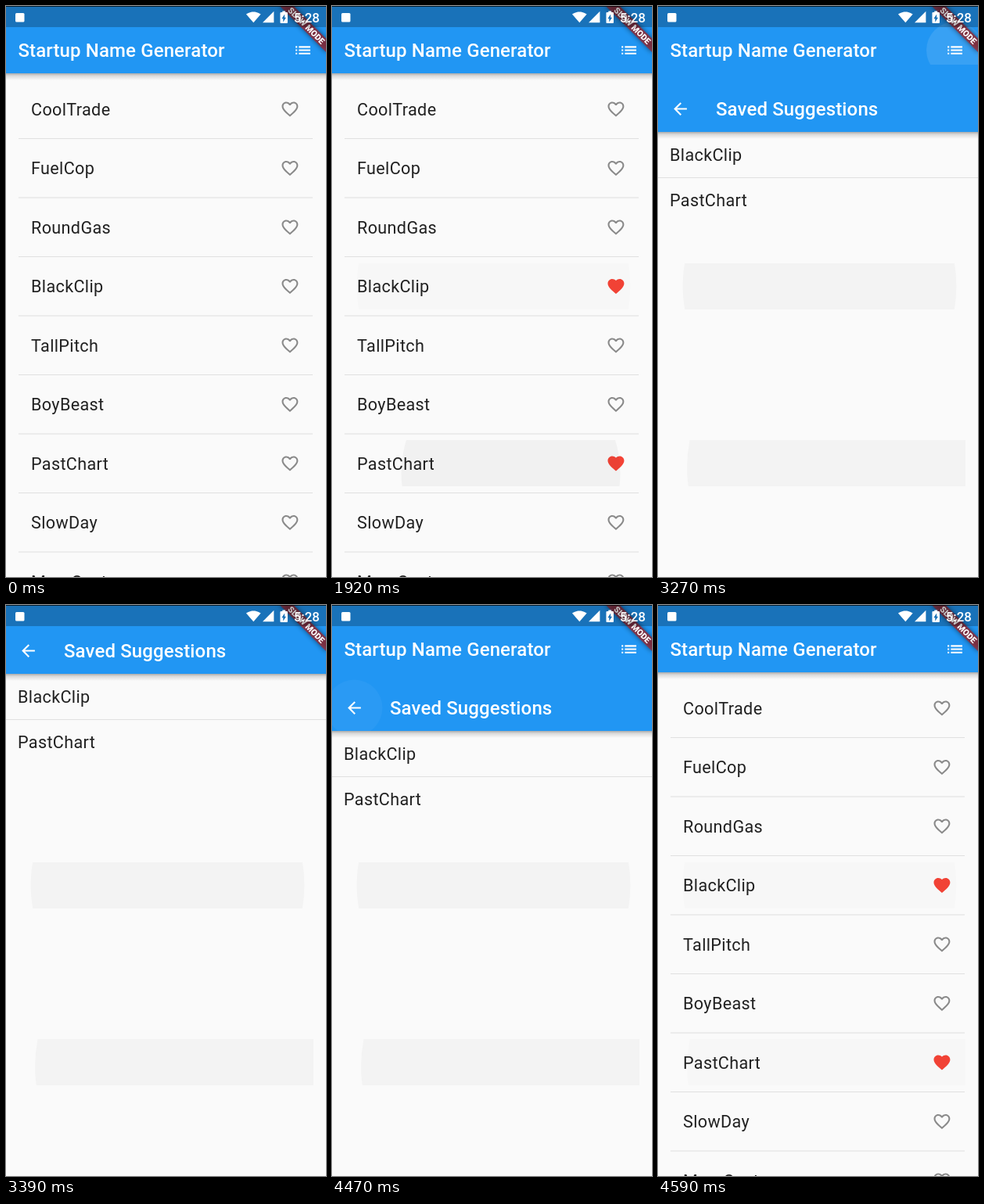
An HTML page that plays this animation: 409 by 730 pixels, repeating every 5.58 s.

```html
<!DOCTYPE html>
<html lang="en">
<head>
<meta charset="utf-8">
<title>Startup Name Generator</title>
<style>
  html, body { margin: 0; width: 100%; height: 100%; overflow: hidden; background: #fafafa; }
  svg { display: block; width: 100vw; height: 100vh; }
  text { font-family: Roboto, "Open Sans", sans-serif; white-space: pre; }
  .title { font-size: 24px; font-weight: 500; letter-spacing: .12px; fill: #fff; }
  .name { font-size: 21.6px; letter-spacing: .35px; fill: #212121; }
  .clock { font-size: 16.8px; font-weight: 500; fill: #fff; }
  .ribbon { font-size: 10.7px; font-weight: 900; fill: #fff; text-anchor: middle; }
</style>
</head>
<body>
<svg viewBox="0 0 409 730">
  <defs>
    <linearGradient id="fade" x1="0" y1="0" x2="0" y2="1">
      <stop offset="0" stop-color="#000" stop-opacity=".32"/>
      <stop offset=".35" stop-color="#000" stop-opacity=".13"/>
      <stop offset="1" stop-color="#000" stop-opacity="0"/>
    </linearGradient>
    <filter id="blur" x="-20%" y="-100%" width="140%" height="300%"><feGaussianBlur stdDeviation="3"/></filter>
    <clipPath id="bar"><rect width="409" height="86"/></clipPath>
    <clipPath id="tileA"><rect x="16" y="329" width="377" height="59"/></clipPath>
    <clipPath id="tileB"><rect x="16" y="555" width="377" height="59"/></clipPath>
    <path id="heartLine" d="M16.5 3c-1.74 0-3.41.81-4.5 2.09C10.91 3.81 9.24 3 7.5 3 4.42 3 2 5.42 2 8.5c0 3.78 3.4 6.86 8.55 11.54L12 21.35l1.45-1.32C18.6 15.36 22 12.28 22 8.5 22 5.42 19.58 3 16.5 3zm-4.4 15.55l-.1.1-.1-.1C7.14 14.24 4 11.39 4 8.5 4 6.5 5.5 5 7.5 5c1.54 0 3.04.99 3.57 2.36h1.87C13.46 5.99 14.96 5 16.5 5c2 0 3.5 1.5 3.5 3.5 0 2.89-3.14 5.74-7.9 10.05z"/>
    <path id="heartFull" d="M12 21.35l-1.45-1.32C5.4 15.36 2 12.28 2 8.5 2 5.42 4.42 3 7.5 3c1.74 0 3.41.81 4.5 2.09C13.09 3.81 14.76 3 16.5 3 19.58 3 22 5.42 22 8.5c0 3.78-3.4 6.86-8.55 11.54L12 21.35z"/>
    <g id="appBar">
      <rect y="86" width="409" height="9" fill="url(#fade)"/>
      <rect width="409" height="86" fill="#2196f3"/>
    </g>
  </defs>

  <g id="home">
    <rect width="409" height="730" fill="#fafafa"/>
    <g id="rows"></g>
    <use href="#appBar"/>
    <circle id="menuInk" cx="379.5" cy="56.5" r="36.5" fill="#fff" clip-path="url(#bar)"/>
    <text class="title" x="15.5" y="64.5">Startup Name Generator</text>
    <path transform="translate(367 44) scale(1.045)" fill="#fff" d="M3 13h2v-2H3zm0 4h2v-2H3zm0-8h2V7H3zm4 4h14v-2H7zm0 4h14v-2H7zM7 7v2h14V7z"/>
  </g>

  <g id="saved">
    <rect width="409" height="730" fill="#fafafa"/>
    <use href="#appBar"/>
    <circle id="backInk" cx="28.5" cy="56.5" r="36" fill="#fff" clip-path="url(#bar)"/>
    <path transform="translate(16 44) scale(1.045)" fill="#fff" d="M20 11H7.83l5.59-5.59L12 4l-8 8 8 8 1.41-1.41L7.83 13H20z"/>
    <text class="title" x="74" y="64.5">Saved Suggestions</text>
    <text class="name" x="15" y="122.7">BlackClip</text>
    <rect y="144" width="409" height="1" fill="#e0e0e0"/>
    <text class="name" x="15" y="181.4">PastChart</text>
  </g>

  <g clip-path="url(#tileA)"><circle id="inkA"/></g>
  <g clip-path="url(#tileB)"><circle id="inkB"/></g>

  <g transform="translate(409 0) rotate(45)">
    <rect x="-41.8" y="29.3" width="83.6" height="12.5" opacity=".5" filter="url(#blur)"/>
    <rect x="-41.8" y="29.3" width="83.6" height="12.5" fill="#b71c1c" fill-opacity=".63"/>
    <text class="ribbon" y="39.3">SLOW MODE</text>
  </g>

  <rect width="409" height="27" fill-opacity=".24"/>
  <rect width="409" height="1" fill-opacity=".75"/>
  <g fill="#fff">
    <rect x="12" y="9" width="11.5" height="11.5" rx="1.5"/>
    <path transform="translate(306.7 5.2) scale(.8 .75)" d="M12 21.5L23.64 7c-.45-.34-4.93-4-11.64-4S.81 6.66.36 7z"/>
    <path d="M328 21.3h14.4V6.8z"/>
    <path transform="translate(343.8 5) scale(.95 .77)" fill-rule="evenodd" d="M15.67 4H14V2h-4v2H8.33C7.6 4 7 4.6 7 5.33v15.33C7 21.4 7.6 22 8.33 22h7.33c.74 0 1.34-.6 1.34-1.33V5.33C17 4.6 16.4 4 15.67 4zM11 20v-5.5H9L13 7v5.5h2z"/>
  </g>
  <text class="clock" x="367.7" y="21">5:28</text>
</svg>

<script>
const LOOP = 5580, TICK = 30;
const $ = id => document.getElementById(id);

const names = ["CoolTrade", "FuelCop", "RoundGas", "BlackClip", "TallPitch",
  "BoyBeast", "PastChart", "SlowDay", "MoreCost"];
const likedAt = { BlackClip: 960, PastChart: 1800 };

// Saved page: [time, offset down, opacity]
const slide = [
  [0, 0, 0],
  [3240, 166, .25], [3270, 75, 1], [3300, 31, 1], [3330, 16, 1],
  [3360, 7, 1], [3390, 2, 1], [3420, 0, 1],
  [4380, 7, 1], [4410, 18, 1], [4440, 39, 1], [4470, 75, 1],
  [4500, 131, .7], [4530, 167, .25], [4560, 180, .06], [4590, 0, 0]
];

// Button inks: [time, opacity]
const menuInk = [[0, 0], [3180, .03], [3240, .06], [3270, .1], [3420, 0]];
const backInk = [[0, 0], [4350, .01], [4410, .03], [4470, .04], [4560, .02], [4590, 0]];

// Row inks, blended: [time, x, y, radius, opacity]
const inkA = [
  [930, 250, 362, 10, 0], [960, 248, 362, 30, .03], [1140, 210, 359, 160, .035],
  [1200, 206.5, 358, 175, .03], [1440, 206.5, 358, 175, .01],
  [3240, 206.5, 358, 175, .01], [3270, 206.5, 358, 175, .028],
  [4560, 206.5, 358, 175, .028], [4590, 206.5, 358, 175, .01]
];
const inkB = [
  [1770, 250, 602, 20, 0], [1800, 246, 601, 60, .035], [1920, 228.5, 597, 140, .035],
  [2040, 217, 590, 180, .03], [2250, 217, 590, 180, .01],
  [3240, 217, 590, 180, .01], [3270, 217, 590, 180, .028],
  [4560, 217, 590, 180, .028], [4590, 217, 590, 180, .01]
];

$("rows").innerHTML = names.map((name, i) => {
  const y = 75.5 * i;
  const heart = (id, shape, color) =>
    `<use id="${id}" href="#${shape}" fill="${color}" transform="translate(350.4 ${119.3 + y}) scale(1.045)"/>`;
  return `<text class="name" x="32" y="${139.5 + y}">${name}</text>` +
    heart("line" + name, "heartLine", "#8a8a8a") +
    (likedAt[name] ? heart("full" + name, "heartFull", "#f44336") : "") +
    `<rect x="16" y="${169 + y}" width="376" height="1" fill="#e0e0e0"/>`;
}).join("");

const step = (keys, t) => keys.findLast(k => k[0] <= t);

function blend(keys, t) {
  const i = keys.findIndex(k => k[0] > t);
  if (i < 0) return keys.at(-1);
  if (i === 0) return keys[0];
  const a = keys[i - 1], b = keys[i], p = (t - a[0]) / (b[0] - a[0]);
  return a.map((v, n) => v + (b[n] - v) * p);
}

function set(id, attrs) {
  for (const key in attrs) $(id).setAttribute(key, attrs[key]);
}

function spread(id, keys, t) {
  const [, cx, cy, r, opacity] = blend(keys, t);
  set(id, { cx, cy, r, opacity });
}

function draw(now) {
  const t = Math.floor((now % LOOP) / TICK) * TICK;
  for (const name in likedAt) {
    const on = t >= likedAt[name];
    set("line" + name, { opacity: on ? 0 : 1 });
    set("full" + name, { opacity: on ? 1 : 0 });
  }
  const [, y, opacity] = step(slide, t);
  set("saved", { transform: `translate(0 ${y})`, opacity });
  set("menuInk", { opacity: step(menuInk, t)[1] });
  set("backInk", { opacity: step(backInk, t)[1] });
  spread("inkA", inkA, t);
  spread("inkB", inkB, t);
}

const start = performance.now();
function frame() {
  draw(performance.now() - start);
  requestAnimationFrame(frame);
}
frame();
</script>
</body>
</html>
```
